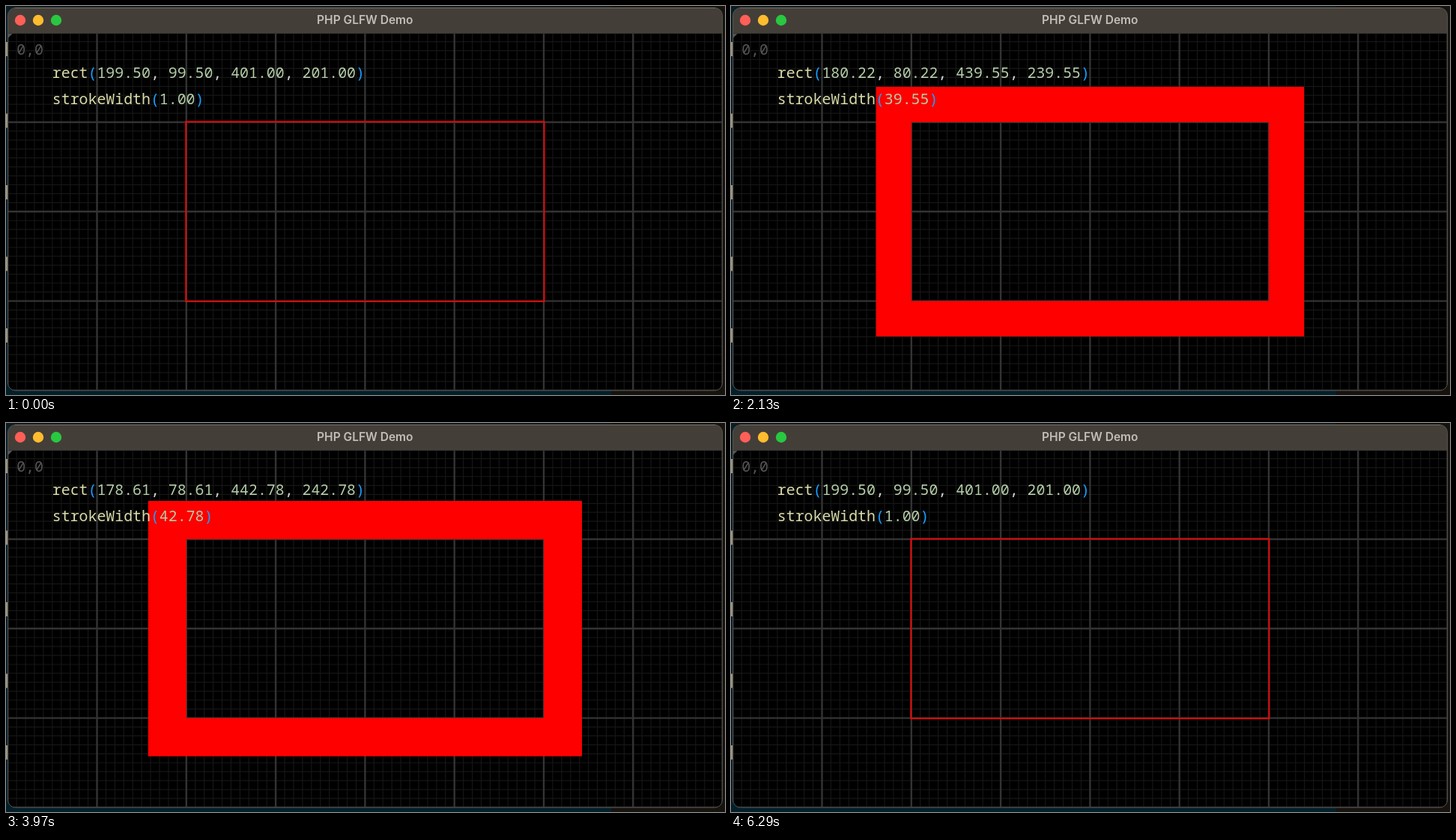
An HTML page with a canvas that plays this animation: 960x519 px, repeating every 6340 ms.

```html
<!DOCTYPE html>
<html lang="en">
<head>
<meta charset="utf-8">
<title>Stroke demo</title>
<style>
html, body { margin: 0; width: 100%; height: 100%; overflow: hidden; background: #03202a; }
canvas { display: block; width: 960px; height: 519px; }
</style>
</head>
<body>
<canvas id="stage" width="960" height="519"></canvas>
<script>
const ctx = document.getElementById('stage').getContext('2d');
const LOOP = 6340, LAST = 6290, STEP = 100 / 3;
const SCALE = 1.193, X0 = 2.2, Y0 = 35.7;
const MONO = '19.88px "Noto Sans Mono", "DejaVu Sans Mono", monospace';
const NAME = '#dcdcaa', PAREN = '#179fff', NUMBER = '#b5cea8', COMMA = '#d4d4d4';

const px = x => X0 + x * SCALE;
const py = y => Y0 + y * SCALE;

// Stroke width swings 1..51 on a cosine; the clock drifts slightly between these times.
const clock = [[0, 1], [1230, 18.02], [2130, 39.55], [2930, 50.49], [3970, 42.78], [4670, 26.9], [LAST, 1]]
  .map(([t, w]) => {
    const a = Math.acos((26 - w) / 25);
    return [t, t > 3142 ? 2 * Math.PI - a : a];
  });

function frameTime(t) {
  if (t >= LAST) return LAST;
  const start = k => Math.round(k * STEP / 10) * 10;
  let k = Math.min(187, Math.floor(t / STEP) + 1);
  while (start(k) > t) k--;
  return start(k);
}

function strokeAt(t) {
  let i = 1;
  while (i < clock.length - 1 && t > clock[i][0]) i++;
  const [t0, a0] = clock[i - 1], [t1, a1] = clock[i];
  const a = a0 + (a1 - a0) * (t - t0) / (t1 - t0);
  return 26 - 25 * Math.cos(a);
}

function fill(color, x, y, w, h) {
  ctx.fillStyle = color;
  ctx.fillRect(x, y, w, h);
}

function gridLines(step, color, width) {
  ctx.strokeStyle = color;
  ctx.lineWidth = width;
  ctx.beginPath();
  for (let x = 0; x <= 800; x += step) {
    ctx.moveTo(px(x), py(0));
    ctx.lineTo(px(x), py(400));
  }
  for (let y = 0; y <= 400; y += step) {
    ctx.moveTo(px(0), py(y));
    ctx.lineTo(px(800), py(y));
  }
  ctx.stroke();
}

function drawDesktop() {
  fill('#03202a', 0, 0, 960, 519);
  fill('#16130f', 808, 0, 152, 519);
  fill('#101a1d', 0, 0, 808, 3);
  for (let i = 0; i < 5; i++) fill('#9c9682', 0, 48 + i * 95.5, 2, 19);
}

function drawTitleBar() {
  fill('#443e38', 2, 2, 955, 34);
  ['#ff5f57', '#febc2e', '#28c840'].forEach((color, i) => {
    ctx.fillStyle = color;
    ctx.beginPath();
    ctx.arc(19 + 24 * i, 19, 7.2, 0, 2 * Math.PI);
    ctx.fill();
  });
  ctx.fillStyle = '#c4beb8';
  ctx.font = '600 15.5px Inter, "Open Sans", sans-serif';
  ctx.textAlign = 'center';
  ctx.fillText('PHP GLFW Demo', 479.3, 24);
  ctx.textAlign = 'left';
}

function drawOrigin() {
  ctx.fillStyle = '#555';
  ctx.beginPath();
  ctx.moveTo(3, 37);
  ctx.lineTo(8.5, 37);
  ctx.lineTo(3, 42.5);
  ctx.fill();
  ctx.font = MONO;
  ctx.fillText('0,0', px(10), 64.5);
}

function drawCall(name, args, y) {
  let x = px(50);
  const put = (text, color) => {
    ctx.fillStyle = color;
    ctx.fillText(text, x, y);
    x += ctx.measureText(text).width;
  };
  ctx.font = MONO;
  put(name, NAME);
  put('(', PAREN);
  args.forEach((value, i) => {
    if (i) put(', ', COMMA);
    put(value.toFixed(2), NUMBER);
  });
  put(')', PAREN);
}

function draw(t) {
  const w = strokeAt(t);
  const rect = [200 - w / 2, 100 - w / 2, 400 + w, 200 + w];

  drawDesktop();
  ctx.save();
  ctx.beginPath();
  ctx.roundRect(2.5, 2.5, 954, 510.5, 10);
  ctx.clip();
  fill('#000', 2, 2, 956, 512);
  gridLines(10, '#161616', 1.2);
  gridLines(100, '#333', 2.4);
  drawTitleBar();
  drawOrigin();
  ctx.strokeStyle = '#f00';
  ctx.lineWidth = Math.max(w * SCALE, 1.7);
  ctx.strokeRect(px(rect[0]), py(rect[1]), rect[2] * SCALE, rect[3] * SCALE);
  drawCall('rect', rect, 95.7);
  drawCall('strokeWidth', [w], 131.4);
  ctx.restore();

  ctx.strokeStyle = '#56534f';
  ctx.lineWidth = 1;
  ctx.beginPath();
  ctx.roundRect(2.5, 2.5, 954, 510.5, 10);
  ctx.stroke();
  fill('#78726b', 12, 2, 935, 1);
}

const began = performance.now();
function tick() {
  draw(frameTime((performance.now() - began) % LOOP));
  requestAnimationFrame(tick);
}
tick();
</script>
</body>
</html>
```
